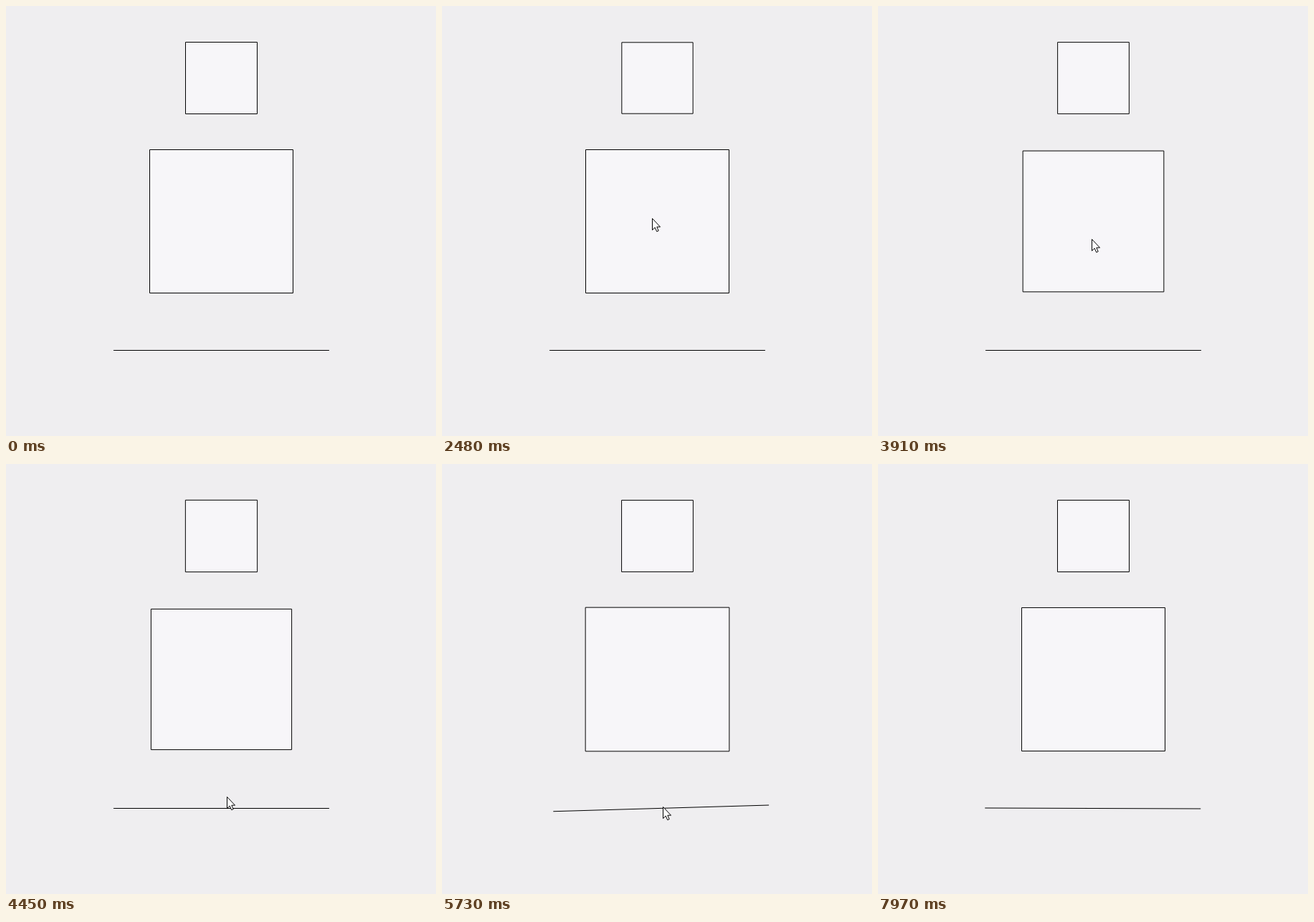
An HTML page with a canvas for the animation above (8000 ms loop, 600x600 px).

```html
<!DOCTYPE html>
<html>
<head>
<meta charset="utf-8">
<style>
  html, body { margin: 0; width: 100%; height: 100%; overflow: hidden; background: #efeef0; }
  canvas { display: block; }
</style>
</head>
<body>
<canvas id="stage" width="600" height="600"></canvas>
<script>
const ctx = document.getElementById('stage').getContext('2d');
const LOOP = 8000, PERIOD = 478, DECAY = 1100;
const arrow = new Path2D('M.5 .5V16.6L4.2 13.1L6.7 18.7L9.2 17.6L6.8 12.2H11.5Z');

const clamp = u => Math.min(1, Math.max(0, u));
const smooth = u => u * u * (3 - 2 * u);

// Damped oscillation that starts with the click
function spring(t, start, size) {
  const d = t - start;
  return d < 0 ? 0 : size * Math.exp(-d / DECAY) * Math.sin(2 * Math.PI * d / PERIOD);
}

function square(cy, size, stretch) {
  const s = size * (1 + stretch);
  ctx.fillStyle = '#f7f6f9';
  ctx.beginPath();
  ctx.rect(300.5 - s / 2, cy - s / 2, s, s);
  ctx.fill();
  ctx.stroke();
}

function line(angle) {
  ctx.save();
  ctx.translate(300.5, 300.5);
  ctx.rotate(angle);
  ctx.beginPath();
  ctx.moveTo(-150.5, 180);
  ctx.lineTo(150.5, 180);
  ctx.stroke();
  ctx.restore();
}

// Eased move between two points, bowed sideways
function glide(t, start, duration, [x0, y0], [x1, y1], bend) {
  const e = smooth(clamp((t - start) / duration));
  return [x0 + (x1 - x0) * e + bend * Math.sin(Math.PI * e), y0 + (y1 - y0) * e];
}

function cursorAt(t) {
  const small = [292, 98], big = [293, 296], low = [308, 476];
  if (t < 270 || t > 6080) return null;
  if (t < 1300) {
    const rest = (1 - clamp((t - 270) / 400)) ** 2;
    return [small[0] - 28 * rest, small[1] - 89 * rest];
  }
  if (t < 3600) return glide(t, 1305, 765, small, big, 8.4);
  if (t < 5680) return glide(t, 3676, 917, big, low, 5.3);
  const u = (t - 5680) / 320;
  return [low[0] + 3 * u * u, low[1] + 82 * u * u];
}

function draw(t) {
  ctx.fillStyle = '#efeef0';
  ctx.fillRect(0, 0, 600, 600);
  ctx.strokeStyle = '#000';
  ctx.lineWidth = 1;
  square(100.5, 100, spring(t, 1064, 0.112));
  square(300.5, 200, spring(t, 2674, 0.097));
  line(spring(t, 5422, 0.048));

  const p = cursorAt(t);
  if (!p) return;
  ctx.save();
  ctx.translate(Math.round(p[0]), Math.round(p[1]));
  ctx.fillStyle = '#fff';
  ctx.fill(arrow);
  ctx.stroke(arrow);
  ctx.restore();
}

const begin = performance.now();
function tick() {
  draw((performance.now() - begin) % LOOP);
  requestAnimationFrame(tick);
}
tick();
</script>
</body>
</html>
```
